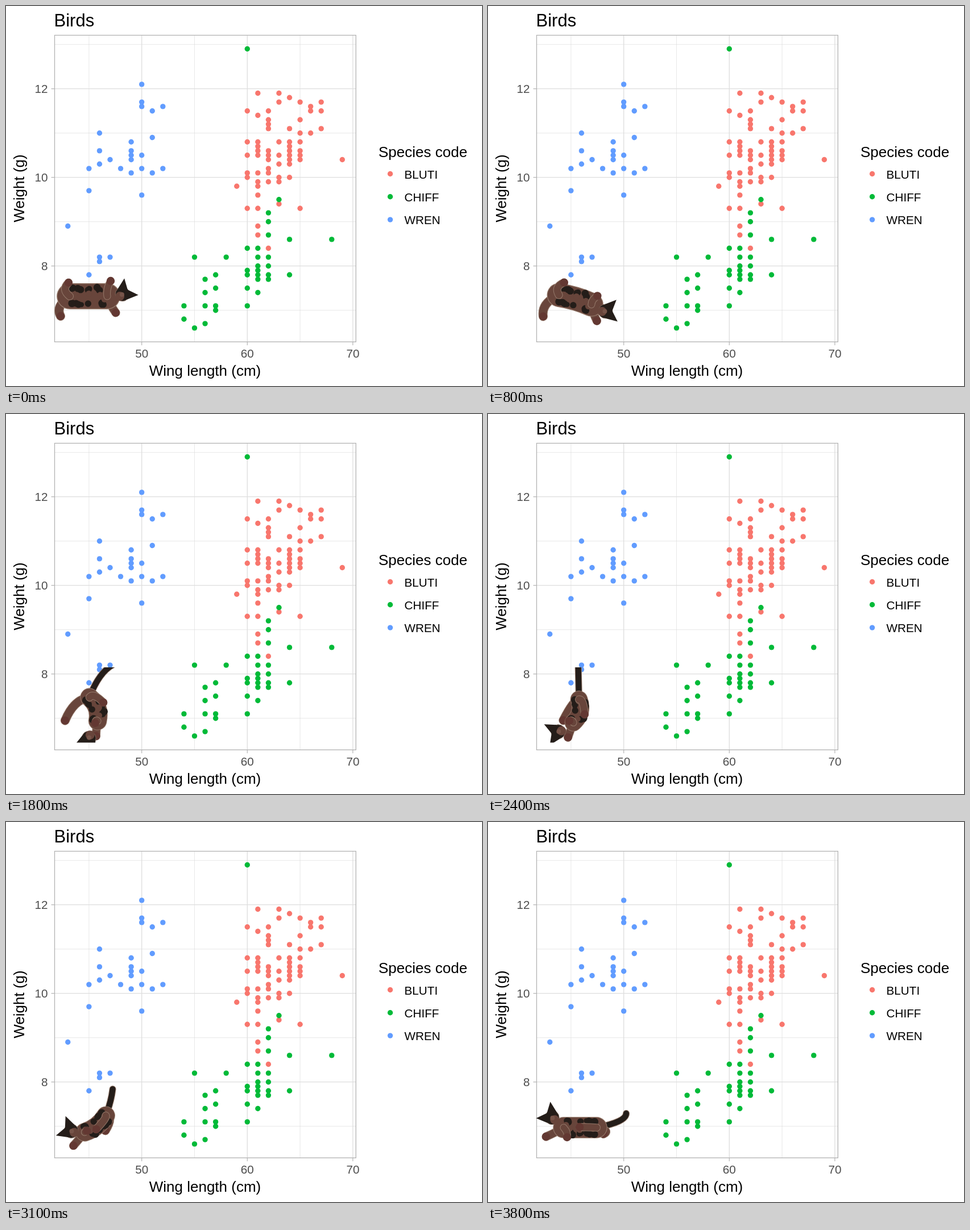
Write an HTML page that moves like this. It is 837 by 669 pixels and loops after 3.9 s.

```html
<!DOCTYPE html>
<html lang="en">
<head>
<meta charset="utf-8">
<title>Birds</title>
<style>
  html, body { margin: 0; width: 100%; height: 100%; overflow: hidden; background: #fff; }
  svg { display: block; width: 837px; height: 669px; font-family: "Liberation Sans", Arial, sans-serif; }
  .title { font-size: 31px; }
  .name { font-size: 26px; }
  .key, .tick { font-size: 20.7px; }
  .tick { fill: #4d4d4d; }
  .mid { text-anchor: middle; }
  .end { text-anchor: end; }
  #cat path { fill: none; stroke-linecap: round; }
  #cat { filter: blur(.45px); }
</style>
</head>
<body>
<svg viewBox="0 0 837 669">
  <defs><clipPath id="crop"><rect x="83" y="446" width="180" height="132.5"/></clipPath></defs>
  <g id="chart"></g>
  <g clip-path="url(#crop)"><g id="cat"></g></g>
</svg>
<script>
const chart = document.getElementById('chart');
const cat = document.getElementById('cat');

function set(el, attrs) {
  for (const k in attrs) el.setAttribute(k, attrs[k]);
  return el;
}
function add(parent, tag, attrs, text) {
  const el = document.createElementNS('http://www.w3.org/2000/svg', tag);
  if (text) el.textContent = text;
  return parent.appendChild(set(el, attrs));
}
const line = (x1, y1, x2, y2, stroke, w) =>
  add(chart, 'line', { x1, y1, x2, y2, stroke, 'stroke-width': w });
const label = (x, y, cls, text, more) =>
  add(chart, 'text', { x, y, class: cls, ...more }, text);
const dot = (cx, cy, fill) => add(chart, 'circle', { cx, cy, r: 4.7, fill });

// Chart
const px = wing => 238.7 + (wing - 50) * 18.56;
const py = grams => 301.7 - (grams - 10) * 78;
const left = 85.5, right = 615.3, upper = 51.5, lower = 591.3;
const grid = '#dedede', edge = '#b3b3b3';

for (let x = 45; x <= 70; x += 5) {
  const major = x % 10 === 0;
  line(px(x), upper, px(x), lower, grid, major ? 1.3 : .7);
  if (!major) continue;
  line(px(x), lower, px(x), lower + 6, edge, 1.2);
  label(px(x), 618.7, 'tick mid', String(x));
}
for (let y = 7; y <= 13; y++) {
  const major = y % 2 === 0;
  line(left, py(y), right, py(y), grid, major ? 1.3 : .7);
  if (!major) continue;
  line(left - 6, py(y), left, py(y), edge, 1.2);
  label(73.5, py(y) + 7.5, 'tick end', String(y));
}

// Birds by wing length: weights in tenths of a gram, [a, b] is a run from a to b
function species(row, name, color, birds) {
  for (const wing in birds)
    for (const entry of birds[wing]) {
      const [from, to = from] = [entry].flat();
      for (let w = from; w <= to; w++) dot(px(+wing), py(w / 10), color);
    }
  const y = 295.5 + row * 40.3;
  dot(675.6, y, color);
  label(700.5, y + 8.3, 'key', name);
}
species(0, 'BLUTI', '#f8766d', {
  59: [98], 60: [93, [100, 101], 105, 108, 115],
  61: [87, 89, 93, 96, [98, 99], 101, [105, 108], 114, 119],
  62: [84, 99, [101, 102], [104, 106], [111, 113], 115],
  63: [94, [99, 100], 103, 105, 108, 117, 119],
  64: [100, [103, 108], 111, 118],
  65: [93, [104, 106], 108, 110, 113, 117],
  66: [110, [115, 116]], 67: [111, 115, 117], 69: [104]
});
species(1, 'CHIFF', '#00ba38', {
  54: [68, 71], 55: [66, 82], 56: [67, 71, 74, 77], 57: [[70, 71], 75, 78], 58: [82],
  60: [71, 75, [78, 79], 84, 129], 61: [74, [77, 80], 82, 84],
  62: [[77, 78], 80, 82, 87, 90, 92], 63: [95], 64: [78, 86], 68: [86]
});
species(2, 'WREN', '#619cff', {
  43: [89], 45: [78, 97, 102], 46: [[81, 82], 103, 106, 110], 47: [82, 104], 48: [102],
  49: [101, [104, 106], 108], 50: [96, 102, 105, [116, 117], 121],
  51: [101, 109, 115], 52: [102, 116]
});

add(chart, 'rect', {
  x: left, y: upper, width: right - left, height: lower - upper,
  fill: 'none', stroke: edge, 'stroke-width': 1.3
});
label(84.5, 35.5, 'title', 'Birds');
label(350, 651, 'name mid', 'Wing length (cm)');
label(0, 0, 'name mid', 'Weight (g)', { transform: 'translate(32 321) rotate(-90)' });
label(655, 266, 'name', 'Species code');

// Cat: it stretches, then rolls half a turn
const LOOP = 3900, STEP = 100, STRETCH = 500, ROLL = 3300;
const dark = '#241d19', brown = '#68453b', pad = '#633832', halo = '#94796a';
const clamp = v => Math.min(1, Math.max(0, v));
const dir = (a, len) => [Math.cos(a) * len, Math.sin(a) * len];
const plus = (p, q) => [p[0] + q[0], p[1] + q[1]];
const mean = (p, q) => [(p[0] + q[0]) / 2, (p[1] + q[1]) / 2];

let seed = 11;
const random = () => (seed = seed * 16807 % 2147483647) / 2147483647;

function skeleton(t) {
  const roll = clamp((t - STRETCH) / ROLL), stretch = clamp(t / STRETCH);
  const turn = roll * Math.PI, arc = Math.sin(turn), ease = Math.sin(turn / 2);
  // Offset along the spine and to the left of it
  const local = (p, along, side) => plus(plus(p, dir(turn, along)), dir(turn - Math.PI / 2, side));

  const hip = [112 + 6 * stretch + 73 * roll, 511 + 3 * stretch + 24 * roll - 26 * arc];
  const shoulder = local(hip, 66 - 20 * arc - 8 * roll, 0);
  const width = 44 - 10 * arc - 8 * roll;
  const spine = [hip, local(mean(hip, shoulder), 0, 14 * arc), shoulder];

  const leg = (root, foot, bend) => [root, local(mean(root, foot), -bend, 0), foot];
  const swing = Math.sin(1.5 * turn);
  const grow = clamp((roll - .15) / .22);
  const tailX = grow * (22 + 30 * Math.cos(9 * (1 - roll)));
  const tailY = -grow * (25 + 35 * arc);
  return {
    local, spine, width,
    tail: [hip, plus(hip, [tailX * roll, tailY * (1 - .6 * roll)]), plus(hip, [tailX, tailY])],
    farHind: leg(hip, plus(hip, [-16 - 28 * swing, 35 - 24 * roll * roll + 10 * arc]), 18),
    nearHind: leg(hip, local(hip, -2 + 32 * ease, 24 - 25 * roll * roll), 14),
    farFront: leg(shoulder, local(shoulder, 15 + 16 * ease, -29 + 45 * roll), 3),
    nearFront: leg(shoulder, local(shoulder, 6 * Math.cos(turn), 27 - 30 * arc - 10 * roll), 5),
    skull: plus(plus(shoulder, dir(-.14 + 4 * ease, 27)), [0, 22 * roll * arc]),
    gaze: -.7 + 4.55 * ease
  };
}

const parts = [];
const curve = ([a, b, c]) => `M${a}Q${b} ${c}`;
const stroke = (color, width) => add(cat, 'path', { stroke: color, 'stroke-width': width });

function limb(name, color, width, hasPaw) {
  const paths = [stroke(halo, width + 2), stroke(color, width)];
  const paw = hasPaw && add(cat, 'circle', { r: 7.2, fill: pad });
  parts.push(s => {
    for (const el of paths) set(el, { d: curve(s[name]) });
    if (paw) set(paw, { cx: s[name][2][0], cy: s[name][2][1] });
  });
}

function body() {
  const coats = [[halo, 1.04], [brown, .98]].map(([color, part]) => [stroke(color, 1), part]);
  const patches = Array.from({ length: 26 }, (_, i) => {
    const side = i % 2 ? 1 : -1;
    const black = i < 20;
    return {
      at: black ? .05 + .85 * random() : random(),
      side: side * (black ? .24 + .12 * random() : .12 * random()),
      el: add(cat, 'circle', { r: 4.5 + 2.5 * random(), fill: black ? dark : brown })
    };
  });
  parts.push(s => {
    for (const [el, part] of coats) set(el, { d: curve(s.spine), 'stroke-width': s.width * part });
    const [a, b, c] = s.spine;
    for (const p of patches) {
      const k = p.at, j = 1 - k;
      const on = a.map((v, n) => j * j * v + 2 * j * k * b[n] + k * k * c[n]);
      const [cx, cy] = s.local(on, 0, p.side * s.width);
      set(p.el, { cx, cy });
    }
  });
}

function head() {
  const skull = add(cat, 'circle', { r: 12.5, fill: dark, stroke: halo, 'stroke-width': .8 });
  const face = add(cat, 'circle', { r: 8, fill: brown });
  const ears = add(cat, 'polygon', { fill: dark });
  const blaze = add(cat, 'circle', { r: 4, fill: '#77554a' });
  parts.push(({ skull: p, gaze }) => {
    const at = (angle, len) => plus(p, dir(gaze + angle, len));
    const place = (el, [cx, cy]) => set(el, { cx, cy });
    place(skull, p);
    place(face, at(Math.PI, 6));
    place(blaze, at(Math.PI, 1));
    const outline = [at(-1.57, 12.5), at(-.75, 28), at(0, 12), at(.75, 28), at(1.57, 12.5), at(0, 3)];
    set(ears, { points: outline.join(' ') });
  });
}

limb('tail', dark, 10);
limb('farHind', brown, 14, true);
limb('farFront', brown, 13, true);
body();
limb('nearHind', brown, 12, true);
head();
limb('nearFront', brown, 11, true);

const start = performance.now();
function tick() {
  const t = Math.floor((performance.now() - start) % LOOP / STEP) * STEP;
  const s = skeleton(t);
  for (const move of parts) move(s);
  requestAnimationFrame(tick);
}
tick();
</script>
</body>
</html>
```
